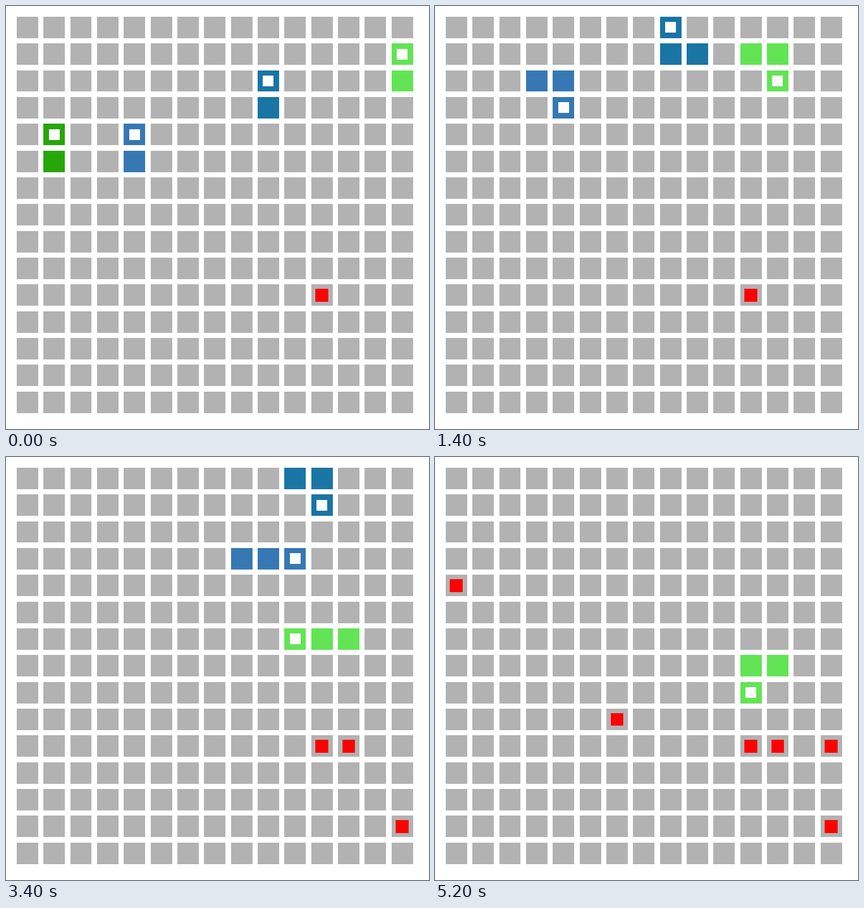
An HTML page with a canvas that plays this animation: 748 px wide and 748 px high, repeating every 5400 ms.

```html
<!DOCTYPE html>
<html lang="en">
<head>
<meta charset="utf-8">
<title>Snakes on a grid</title>
<style>
html, body { margin: 0; width: 100%; height: 100%; overflow: hidden; background: #fff; }
canvas { display: block; }
</style>
</head>
<body>
<canvas id="board" width="748" height="748"></canvas>
<script>
const ctx = document.getElementById('board').getContext('2d');
const SIZE = 748, COUNT = 15, STEP = 200, STEPS = 27;
const PITCH = SIZE / (COUNT + 0.8);
const DIRS = { U: [0, -1], D: [0, 1], L: [-1, 0], R: [1, 0] };

// Each snake starts at its tail cell, follows its moves and dies when they run out.
const snakes = [
  { color: '#26a60a', start: [1, 5], moves: 'UL' },
  { color: '#3678b4', start: [4, 5], moves: 'ULLURURDRURDRDRURRRDLD' },
  { color: '#1975a4', start: [9, 3], moves: 'UURULDLULDRDRURURDRDRR' },
  { color: '#62e454', start: [14, 2], moves: 'ULLULDRDRDLDLDRDLLLDRURRDLD' }
];
for (const snake of snakes) {
  snake.path = [snake.start];
  for (const move of snake.moves) {
    const [x, y] = snake.path.at(-1), [dx, dy] = DIRS[move];
    snake.path.push([x + dx, y + dy]);
  }
}

// Column, row and the step at which the food appears.
const foods = [[11, 10, 0], [12, 10, 10], [14, 13, 17], [6, 9, 22], [14, 10, 23], [0, 4, 25]];

const snap = v => Math.round(v * PITCH - 0.015);

// Square centred in a cell; size is a fraction of the pitch.
function square([x, y], size, color) {
  const edge = 0.8 - size / 2;
  const left = snap(x + edge), top = snap(y + edge);
  ctx.fillStyle = color;
  ctx.fillRect(left, top, snap(x + edge + size) - left, snap(y + edge + size) - top);
}

function draw(step) {
  ctx.fillStyle = '#fff';
  ctx.fillRect(0, 0, SIZE, SIZE);
  for (let y = 0; y < COUNT; y++)
    for (let x = 0; x < COUNT; x++) square([x, y], 0.8, '#b2b2b2');
  for (const [x, y, born] of foods)
    if (step >= born) square([x, y], 0.48, '#f00');
  for (const { color, path } of snakes) {
    const head = step + 1;
    if (head >= path.length) continue;
    for (const cell of path.slice(Math.max(0, head - 2), head + 1)) square(cell, 0.8, color);
    square(path[head], 0.4, '#fff');
  }
}

const begin = performance.now();
function tick() {
  draw(Math.floor((performance.now() - begin) / STEP) % STEPS);
  requestAnimationFrame(tick);
}
tick();
</script>
</body>
</html>
```
